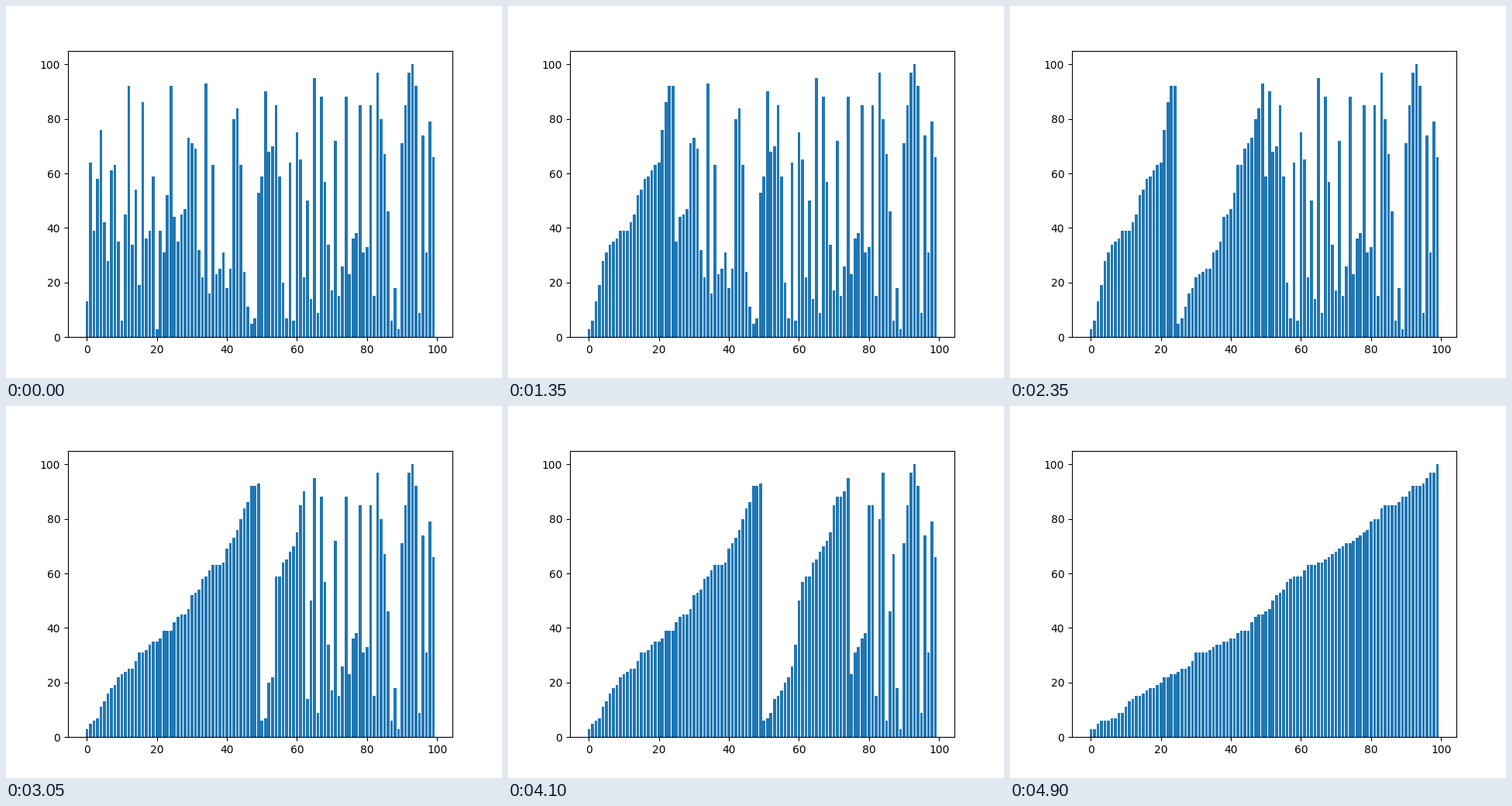
Animation of 640x480 px, one loop 4.95 s. Source, as a matplotlib script:

```python
import matplotlib.pyplot as plt
from matplotlib.animation import FuncAnimation

VALUES = [
    13, 64, 39, 58, 76, 42, 28, 61, 63, 35, 6, 45, 92, 34, 54, 19, 86, 36, 39, 59,
    3, 39, 31, 52, 92, 44, 35, 45, 47, 73, 71, 69, 32, 22, 93, 16, 63, 23, 25, 31,
    18, 25, 80, 84, 63, 24, 11, 5, 7, 53, 59, 90, 68, 70, 85, 59, 20, 7, 64, 6,
    75, 65, 22, 50, 14, 95, 9, 88, 57, 34, 17, 72, 15, 26, 88, 23, 36, 38, 85, 31,
    33, 85, 15, 97, 80, 67, 46, 6, 18, 3, 71, 85, 97, 100, 92, 9, 74, 31, 79, 66,
]


def merge_sort(values, first, last):
    """Sort values[first..last] in place, yielding a snapshot after every merge."""
    if first >= last:
        return
    middle = (first + last) // 2
    yield from merge_sort(values, first, middle)
    yield from merge_sort(values, middle + 1, last)
    values[first:last + 1] = sorted(values[first:last + 1])
    yield values.copy()


snapshots = list(merge_sort(VALUES.copy(), 0, len(VALUES) - 1))

fig, ax = plt.subplots(figsize=(6.4, 4.8), dpi=100)
bars = ax.bar(range(len(VALUES)), VALUES, color="#1f77b4")


def update(frame):
    for bar, height in zip(bars, snapshots[frame]):
        bar.set_height(height)
    return bars.patches


animation = FuncAnimation(fig, update, frames=len(snapshots), interval=50,
                          repeat=True, repeat_delay=0)
plt.show()
```
